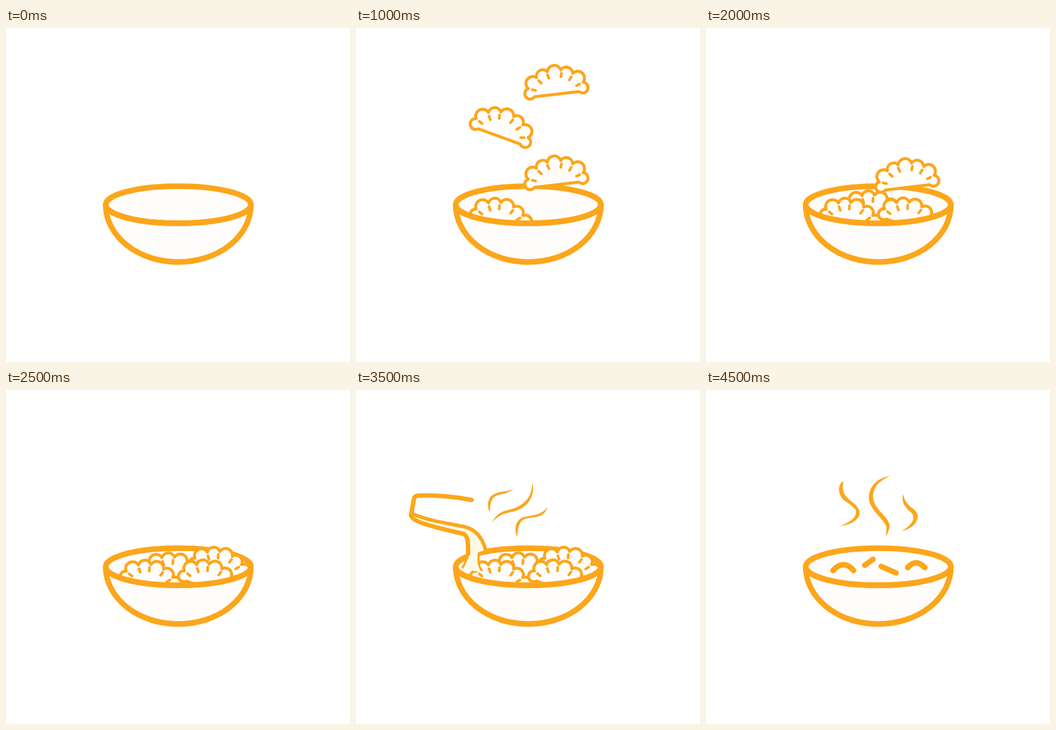
These frames come from a looping animation (585 by 568 pixels, 5 s). An HTML page:

```html
<!DOCTYPE html>
<html lang="en">
<head>
<meta charset="utf-8">
<title>Dumpling soup</title>
<style>
  html, body { margin: 0; width: 100%; height: 100%; overflow: hidden; background: #fff; }
  svg { display: block; width: 100%; height: 100%; }
  .line { fill: none; stroke: #fca61b; stroke-linecap: round; stroke-linejoin: round; }
  .bowl { stroke-width: 9.5; }
  .steam { fill: #fca61b; }
  .milk { fill: #fdfae7; }
  .scene { visibility: hidden; animation: slot 5s step-end infinite; animation-delay: calc(var(--n) * .5s - 5s); }
  @keyframes slot {
    0% { visibility: visible; }
    10%, 100% { visibility: hidden; }
  }
</style>
</head>
<body>
<svg viewBox="0 0 585 568">
  <defs>
    <clipPath id="inside"><path d="M169.500 0V300.500A123.500 31.500 0 0 0 416.500 300.500V0Z"/></clipPath>

    <g id="dumpling" class="line" stroke-width="5">
      <path fill="#fffefd" d="M-38 -2A9.200 9.200 0 1 1 -47 -17A11.700 11.700 0 0 1 -31 -34A11 11 0 0 1 -11.500 -42A11.800 11.800 0 0 1 11.500 -42A11 11 0 0 1 31 -34A11.700 11.700 0 0 1 47 -17A9.200 9.200 0 1 1 38 -2Z"/>
      <path stroke-width="4.500" d="M-40.500 -14.500L-35 -12.500M-28 -28.500L-24 -23.500M-12 -36.500L-10.200 -30.500M12 -36.500L10.200 -30.500M28 -28.500L24 -23.500M40.500 -14.500L35 -12.500"/>
    </g>
    <use id="left" href="#dumpling" transform="translate(242.800 66.200) rotate(20)"/>
    <use id="right" href="#dumpling" transform="translate(341.700 148.500) rotate(-6.700)"/>

    <!-- dumplings resting in the bowl -->
    <use id="a" href="#left" y="274"/>
    <use id="b" href="#left" x="99" y="273.500"/>
    <use id="c" href="#left" x="40" y="261.500"/>
    <use id="d" href="#left" x="117" y="252"/>
    <g id="full" clip-path="url(#inside)">
      <use href="#d"/><use href="#c"/><use href="#a"/><use href="#b"/>
    </g>

    <g id="cupSteam" class="steam">
      <path d="M97 50C98 70 78 72 77.500 89C78 98 84 104 91 109C86 100 82 95 83 87C84 76 100 68 97 50Z"/>
      <path d="M112 23C125 30 132 45 131.500 58C130 78 108 90 107 119C100 90 126 78 126 58C126 42 122 32 112 23Z"/>
      <path d="M161 37C167 58 143 68 143 84C143 95 148 102 156 109C144 103 138 95 138 85C138 70 160 60 161 37Z"/>
    </g>

    <g id="pourSteam" class="steam">
      <path d="M269 168C254 180 242 174 233 184C228 190 229 199 227 208C222 194 225 184 232 179C243 171 257 174 269 168Z"/>
      <path d="M300 157C304 176 297 195 276 204C262 210 246 207 232 225C242 202 262 206 274 199C292 190 299 178 300 157Z"/>
      <path d="M326 199C318 222 298 213 284 221C275 227 276 238 274 250C269 237 271 226 279 219C293 211 312 217 326 199Z"/>
    </g>

    <g id="cup" class="line" stroke="#f9a13a">
      <path class="milk" stroke="none" d="M80 136L138 142Q134 172 120 213L106 223L76 218Q71 190 80 136Z"/>
      <path stroke-width="6" d="M80 135.500L138 141.500"/>
      <path stroke-width="8.500" d="M80 122Q72 165 72.500 205Q72 217 82 219L106 223Q116 224 120 213Q135 172 141 131"/>
    </g>

    <g id="pour" class="line">
      <path class="milk" stroke="none" d="M97 211C128 224 160 227 186 233Q212 240 220 272L208 276Q206 298 214 308Q200 310 187 303Q193 288 191 264Q191 248 184 246Q130 236 95 216Z"/>
      <path stroke-width="7.500" d="M196.500 187Q150 178 106 179.500Q99 180 98.500 186L93.500 213Q95 222 124 230Q150 237.500 182 244.500Q190 247 190.500 264V279"/>
      <path stroke-width="6" d="M97 211C128 224 160 227 186 233Q212 240 220 271"/>
      <path stroke-width="3.500" d="M190 279Q188 292 181 302M209 277Q206 297 214 307"/>
    </g>

    <path id="noodles" class="line" stroke-width="9.500" d="M216 307Q234 287 251 307M270 298L284 288M298 300L323 311M343 302Q357 286 372 302"/>

    <path id="wisp" class="steam" d="M234 155C223 160 224 177 234 187C246 196 256 200 255 209C254 220 240 226 228 232C250 227 261 220 261 209C261 197 246 190 239 182C231 173 232 163 234 155Z"/>
    <g id="wisps" class="steam">
      <path d="M314 146C284 151 276 170 277 186C279 205 306 222 307 234C307 240 306 244 306 249C310 242 312 237 312 230C311 215 285 203 284 182C284 166 294 154 314 146Z"/>
      <path d="M335 177C332 190 338 198 344 204C352 210 354 215 352 221C349 229 342 234 333 240C350 236 360 226 360 214C359 206 352 202 345 196C339 190 338 186 335 177Z"/>
    </g>
  </defs>

  <g class="line bowl">
    <path fill="#fffdfc" d="M169.500 300.500A123.500 97.500 0 0 0 416.500 300.500"/>
    <ellipse fill="#fffdfc" cx="293" cy="300.500" rx="123.500" ry="31.500"/>
  </g>

  <g class="scene" style="--n:1">
    <use href="#left"/><use href="#right"/><use href="#left" y="153.500"/>
  </g>
  <g class="scene" style="--n:2">
    <g clip-path="url(#inside)"><use href="#a"/></g>
    <use href="#right" y="-34"/><use href="#left" y="120"/><use href="#right" y="120"/>
  </g>
  <g class="scene" style="--n:3">
    <g clip-path="url(#inside)"><use href="#a"/><use href="#b"/></g>
    <use href="#right" y="42"/><use href="#left" y="196"/>
  </g>
  <g class="scene" style="--n:4">
    <g clip-path="url(#inside)"><use href="#c"/><use href="#a"/><use href="#b"/></g>
    <use href="#right" x="1.500" y="124.500"/>
  </g>
  <g class="scene" style="--n:5"><use href="#full"/></g>
  <g class="scene" style="--n:6">
    <use href="#full"/><use href="#cup"/><use href="#cupSteam"/>
    <path d="M177 134.500Q187 136 195 141" fill="none" stroke="#ddd"/>
  </g>
  <g class="scene" style="--n:7">
    <use href="#full"/><use href="#pour"/><use href="#pourSteam"/>
  </g>
  <g class="scene" style="--n:8">
    <use href="#noodles"/><use href="#pour"/><use href="#wisp"/>
  </g>
  <g class="scene" style="--n:9">
    <use href="#noodles"/><use href="#wisp"/><use href="#wisps"/>
  </g>

  <path class="line bowl" d="M169.500 300.500A123.500 31.500 0 0 0 416.500 300.500"/>
</svg>
</body>
</html>
```
